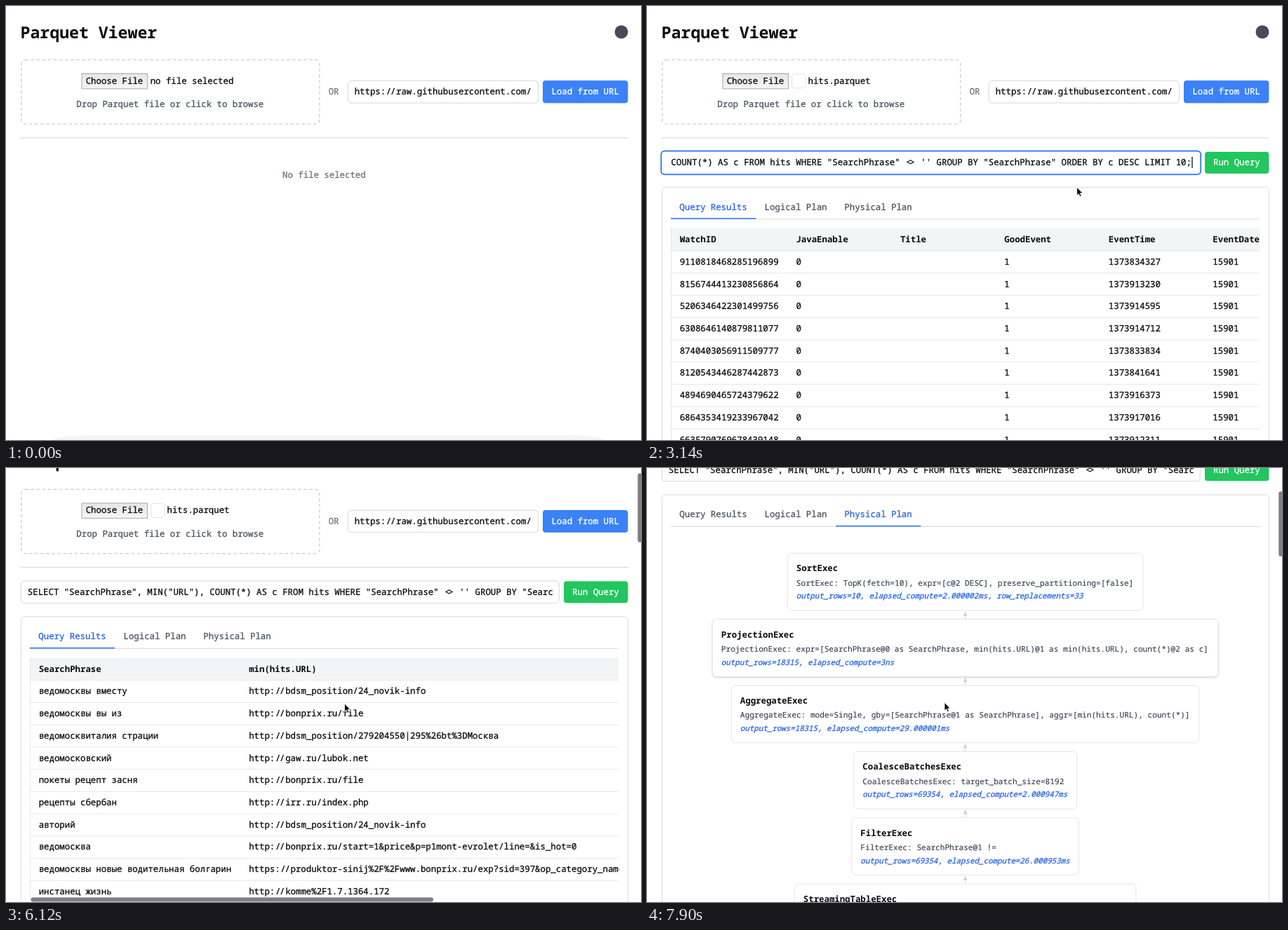
An HTML page for the animation above (8 s loop, 905x619 px).

```html
<!DOCTYPE html>
<html lang="en">
<head>
<meta charset="utf-8">
<title>Parquet Viewer</title>
<style>
html, body { margin: 0; width: 100%; height: 100%; overflow: hidden; background: #fff; }
svg { display: block; }
text {
  font: 500 12.37px "Noto Sans Mono", "DejaVu Sans Mono", monospace;
  text-rendering: geometricPrecision;
  white-space: pre;
  fill: currentColor;
  stroke: currentColor;
  stroke-width: .3px;
}
.h1 { font-size: 23.19px; font-weight: 700; stroke: none; }
.b { font-weight: 700; stroke: none; }
.detail { font-size: 11.13px; stroke-width: .15px; }
.out { font-size: 10.82px; font-style: italic; }
.hover { filter: drop-shadow(0 1.5px 1.5px rgba(0, 0, 0, .17)); }
</style>
</head>
<body>
<svg id="stage" width="905" height="619" viewBox="0 0 905 619"></svg>
<script>
const LOOP = 8000;
const INK = '#0b0b0f', GRAY = '#4b5563', MUTED = '#6b7280', LINE = '#d9dbe0', PALE = '#e5e7eb';
const BLUE = '#3b82f6', LINK = '#2563eb', GREEN = '#22c55e', GREEN_DARK = '#16a34a', BAR = '#7f7f7f';

// ---- drawing helpers ----
const esc = s => s.replace(/&/g, '&amp;').replace(/</g, '&lt;');
// Draw // and <> tighter, like a coding font does.
const tighten = s => s.replace(/(\/|&lt;)(\/|>)(.)/g, (m, a, b, c) => {
  const d = a === '/' ? .6 : 1.2;
  return `<tspan dx="${d}">${a}</tspan><tspan dx="${-2 * d}">${b}</tspan><tspan dx="${d}">${c}</tspan>`;
});
const text = (x, y, s, color = INK, cls = '') =>
  `<text x="${x}" y="${y}" color="${color}" class="${cls}">${tighten(esc(s))}</text>`;
const rect = (x, y, w, h, fill, more = '') =>
  `<rect x="${x}" y="${y}" width="${w}" height="${h}" fill="${fill}" ${more}/>`;
const frame = (x, y, w, h, r, color = '#d4d7dd', more = '') =>
  rect(x, y, w, h, '#fff', `rx="${r}" stroke="${color}" ${more}`);
const group = (id, body, more = '') => `<g id="${id}" ${more}>${body}</g>`;

// ---- content ----
const QUERY = `SELECT "SearchPhrase", MIN("URL"), COUNT(*) AS c FROM hits WHERE "SearchPhrase" <> '' ` +
  `GROUP BY "SearchPhrase" ORDER BY c DESC LIMIT 10;`;

const HITS = [
  ['9110818468285196899', '1373834327'], ['8156744413230856864', '1373913230'],
  ['5206346422301499756', '1373914595'], ['6308646140879811077', '1373914712'],
  ['8740403056911509777', '1373833834'], ['8120543446287442873', '1373841641'],
  ['4894690465724379622', '1373916373'], ['6864353419233967042', '1373917016'],
  ['6635790769678439148', '1373912311']
].map(([id, time]) => [id, '0', '', '1', time, '15901']);

const PHRASES = [
  ['ведомосквы вместу', 'http://bdsm_position/24_novik-info'],
  ['ведомосквы вы из', 'http://bonprix.ru/file'],
  ['ведомосквиталия страции', 'http://bdsm_position/279204550|295%26bt%3DМосква'],
  ['ведомосковский', 'http://gaw.ru/lubok.net'],
  ['покеты рецепт засня', 'http://bonprix.ru/file'],
  ['рецепты сбербан', 'http://irr.ru/index.php'],
  ['авторий', 'http://bdsm_position/24_novik-info'],
  ['ведомосква', 'http://bonprix.ru/start=1&price&p=p1mont-evrolet/line=&is_hot=0'],
  ['ведомосквы новые водительная болгарин', 'https://produktor-sinij%2F%2Fwww.bonprix.ru/exp?sid=397&op_category_name'],
  ['инстанец жизнь', 'http://komme%2F1.7.1364.172']
];

const PLAN = [
  [200, 'SortExec', 'TopK(fetch=10), expr=[c@2 DESC], preserve_partitioning=[false]',
    'output_rows=10, elapsed_compute=2.000002ms, row_replacements=33'],
  [93, 'ProjectionExec', 'expr=[SearchPhrase@0 as SearchPhrase, min(hits.URL)@1 as min(hits.URL), count(*)@2 as c]',
    'output_rows=18315, elapsed_compute=3ns'],
  [120, 'AggregateExec', 'mode=Single, gby=[SearchPhrase@1 as SearchPhrase], aggr=[min(hits.URL), count(*)]',
    'output_rows=18315, elapsed_compute=29.000001ms'],
  [294.5, 'CoalesceBatchesExec', 'target_batch_size=8192', 'output_rows=69354, elapsed_compute=2.000947ms'],
  [291.5, 'FilterExec', 'SearchPhrase@1 !=', 'output_rows=69354, elapsed_compute=26.000953ms'],
  [210, 'StreamingTableExec', '', '']
];

// ---- page parts ----
const header = () =>
  text(20.5, 45.5, 'Parquet Viewer', INK, 'h1') +
  '<circle cx="877" cy="37" r="9.5" fill="#454b5b"/>' +
  frame(21.8, 76.8, 425, 91.6, 5.5, '#d1d3d8', 'stroke-width="1.5" stroke-dasharray="4.6 3.5"') +
  rect(108, 96.5, 93.5, 21.5, 'url(#btn)', 'stroke="#a9a9a9"') +
  text(113.7, 110.6, 'Choose File') +
  group('noName', text(205.7, 110.6, 'no file selected')) +
  group('fileName', frame(206.5, 97, 19.5, 20, 3.5, '#d9d9d9', 'stroke-dasharray="3 1"') +
    text(229.5, 110.6, 'hits.parquet')) +
  text(100.3, 144, 'Drop Parquet file or click to browse', GRAY) +
  text(459.7, 126.4, 'OR', MUTED) +
  frame(487.2, 106.7, 271.3, 31.6, 4.5) +
  text(496.7, 126.4, 'https://raw.githubusercontent.com/') +
  rect(765, 106.3, 121.4, 32.2, BLUE, 'rx="4"') +
  text(777.4, 126.4, 'Load from URL', '#fff') +
  rect(21, 187.4, 865.5, 1.2, LINE);

const queryBar = () =>
  frame(21.3, 207.5, 767, 31.8, 4.5) +
  group('ring', frame(20.2, 206.7, 769, 33.6, 5, BLUE, 'stroke-width="2"')) +
  '<g clip-path="url(#field)">' +
  rect(31, 215, 0, 16, '#b3d7ff', 'id="mark"') +
  group('shortQuery', text(30.8, 227.3, 'select * from "hits" limit 10')) +
  group('longQuery', text(30.8, 227.3, QUERY)) + '</g>' +
  rect(776.4, 215, 1.2, 16, '#000', 'id="caret"') +
  rect(795, 208, 91.4, 31, GREEN, 'rx="4" id="run"') +
  text(807, 227.3, 'Run Query', '#fff');

function tabs() {
  const names = [['Query Results', 34, 121.2], ['Logical Plan', 155.2, 113.8], ['Physical Plan', 269, 121.2]];
  return rect(34, 303.5, 839.5, 1, LINE) +
    names.map(([s, x], i) => group('tab' + i, text(x + 12.3, 290.7, s, 'inherit'))).join('') +
    [0, 2].map(i => rect(names[i][1], 302.3, names[i][2], 1.7, BLUE, `id="line${i}"`)).join('');
}

function table(id, cols, heads, rows) {
  let s = rect(34, 317, 839.5, 32, '#f3f4f6');
  const cells = (list, y, cls) => list.map((v, i) => v && text(cols[i], y, v, INK, cls)).join('');
  s += cells(heads, 337, 'b');
  rows.forEach((row, i) => {
    const y = 348.7 + 31.72 * i;
    s += rect(34, y, 839.5, 1, PALE) + cells(row, +(y + 20.1).toFixed(2), '');
  });
  return group(id, s + rect(34, 317, 1, 360, PALE), 'clip-path="url(#grid)"');
}

const plan = () => PLAN.map(([x, name, detail, out], i) => {
  const y = +(342 + 94.3 * i).toFixed(1);
  const arrow = i ? `<path d="M450.6 ${y - 5}l3-6.5 3 6.5z" fill="#d0d2d6"/>` + rect(453.1, y - 5, 1, 5, '#d5d7db') : '';
  return arrow + group('box' + i, frame(x + .3, y, (453.6 - x) * 2 - .6, 81.6, 5.5, '#e3e5e9')) +
    text(x + 12.8, y + 25.9, name, INK, 'b') +
    text(x + 12.8, y + 46.3, `${name}: ${detail}`, '#374151', 'detail') +
    text(x + 12.8, y + 64.8, out, LINK, 'out');
}).join('');

const CURSORS = {
  arrow: '<path d="M0 0V11.6L2.6 9.2 4.3 13.2 6.3 12.4 4.6 8.5H8.2Z" fill="#000" stroke="#fff" stroke-width=".8"/>',
  beam: '<path d="M-2.5-6Q0-6 0-4.5Q0-6 2.5-6M0-4.5V4.5M-2.5 6Q0 6 0 4.5Q0 6 2.5 6M-1.3 2H1.3" fill="none" stroke="#111" stroke-width="1.1"/>',
  hand: '<path d="M-2.4-5.2Q-1.4-6.6-.6-5.2L0-1.6Q1.4-2.3 1.9-1.1 3.2-1.7 3.6-.4 5-.6 5 1V3.4L3.8 6.8H-1.8L-4.6 2.6Q-5.2.8-3.6 1L-1.8 2.2Z" fill="#fff" stroke="#000"/>'
};

const stage = document.getElementById('stage');
stage.innerHTML =
  '<defs><linearGradient id="btn" x2="0" y2="1"><stop stop-color="#e6e6e6"/><stop offset="1" stop-color="#f6f6f6"/></linearGradient>' +
  `<clipPath id="field">${rect(30.5, 208, 749, 31, '#000')}</clipPath>` +
  `<clipPath id="grid">${rect(34, 317, 839.5, 348, '#000')}</clipPath></defs>` +
  group('page', header() +
    group('empty', text(394, 245, 'No file selected', MUTED) +
      '<path d="M62 620Q85 612 118 612H804Q837 612 860 620Z" fill="#f4f4f4"/>') +
    group('work', queryBar() + frame(21.4, 258.6, 865, 900, 5, LINE) + tabs() +
      table('hits', [46.7, 212.4, 360.9, 509.3, 657.8, 806.3],
        ['WatchID', 'JavaEnable', 'Title', 'GoodEvent', 'EventTime', 'EventDate'], HITS) +
      table('phrases', [46.7, 346.2], ['SearchPhrase', 'min(hits.URL)'], PHRASES) +
      group('plan', plan()) +
      rect(35.5, 659, 573.5, 5.8, BAR, 'rx="2.9" id="hbar"'))) +
  rect(900.3, 8, 8, 92, BAR, 'rx="2.9" id="vbar"') +
  Object.entries(CURSORS).map(([id, s]) => group(id, s)).join('');

const el = id => document.getElementById(id);
const show = (id, on) => { el(id).style.display = on ? '' : 'none'; };

// ---- timing ----
// The screen refreshes only at these moments: [first, count, gap].
const STEPS = [[0, 8, 150], [1350, 4, 150], [2400, 4, 146], [3140, 3, 150], [3740, 1, 0],
  [4940, 4, 146], [5830, 6, 145], [6850, 8, 150]]
  .flatMap(([from, n, gap]) => Array.from({ length: n }, (_, i) => from + i * gap));

const POINTER = [
  [0, 890, 640, 'arrow'], [150, 880, 600, 'arrow'], [1050, 262, 113, 'arrow'], [1350, 265, 122, 'arrow'],
  [1640, 284, 205, 'beam'], [1800, 288.5, 222, 'beam'], [2390, 288.5, 222, 'beam'], [2830, 24, 192, 'beam'],
  [3140, 612.7, 258.5, 'arrow'], [3440, 835, 234.5, 'hand'], [4940, 835, 234.5, 'hand'], [5080, 740, 262, 'arrow'],
  [5370, 482.5, 336, 'arrow'], [6130, 482.5, 336, 'arrow'], [6550, 330, 244, 'hand'], [6850, 330, 244, 'hand'],
  [7000, 424.5, 335, 'beam'], [7150, 424, 334.5, 'arrow'], [8000, 424, 334.5, 'arrow']
];
const SCROLL = [[0, 0], [5700, 0], [6120, 46.4], [6260, 47.3], [7000, 47.3], [7300, 75], [7900, 220.4], [8000, 220.4]];

function at(keys, t, ease = k => k) {
  let i = 0;
  while (i < keys.length - 2 && t >= keys[i + 1][0]) i++;
  const [a, b] = [keys[i], keys[i + 1]];
  const k = ease((t - a[0]) / (b[0] - a[0]));
  return a.map((v, j) => typeof v === 'number' ? v + (b[j] - v) * k : v);
}
const smooth = k => k * k * (3 - 2 * k);

function draw(now) {
  const time = now % LOOP;
  const t = STEPS.filter(s => s <= time).pop();
  const within = (a, b = LOOP) => t >= a && t < b;
  const [, x, y, kind] = at(POINTER, t, smooth);
  const scroll = at(SCROLL, t)[1];
  const planOpen = within(6850);

  show('noName', within(0, 1050));
  show('fileName', within(1050));
  show('empty', within(0, 1350));
  show('work', within(1350));
  show('ring', within(2400, 3740));
  show('mark', within(2400, 3140));
  show('shortQuery', within(0, 3140));
  show('longQuery', within(3140));
  show('caret', within(3140, 3740));
  show('hits', within(0, 4940));
  show('phrases', within(4940, 6850));
  show('plan', planOpen);
  show('line0', !planOpen);
  show('line2', planOpen);
  show('hbar', within(5830, 6850));
  show('vbar', within(5830));

  const left = Math.min(246, Math.max(31, x));
  el('mark').setAttribute('x', left);
  el('mark').setAttribute('width', 246 - left);
  el('longQuery').setAttribute('transform', `translate(${within(3140, 3740) ? -256 : 0} 0)`);
  el('run').setAttribute('fill', within(3440, 5080) ? GREEN_DARK : GREEN);
  [0, 1, 2].forEach(i => el('tab' + i).setAttribute('color', i === (planOpen ? 2 : 0) ? LINK : GRAY));
  el('box0').setAttribute('class', within(7000, 7450) ? 'hover' : '');
  el('box1').setAttribute('class', within(7450) ? 'hover' : '');

  el('page').setAttribute('transform', `translate(0 ${-scroll})`);
  el('vbar').setAttribute('y', 1 + scroll * .147);
  el('vbar').setAttribute('height', planOpen ? 92.5 : 98);
  for (const id in CURSORS) {
    show(id, id === kind);
    el(id).setAttribute('transform', `translate(${x} ${y})`);
  }
}

const start = performance.now();
function tick() {
  draw(Math.max(0, performance.now() - start));
  requestAnimationFrame(tick);
}
tick();
</script>
</body>
</html>
```
